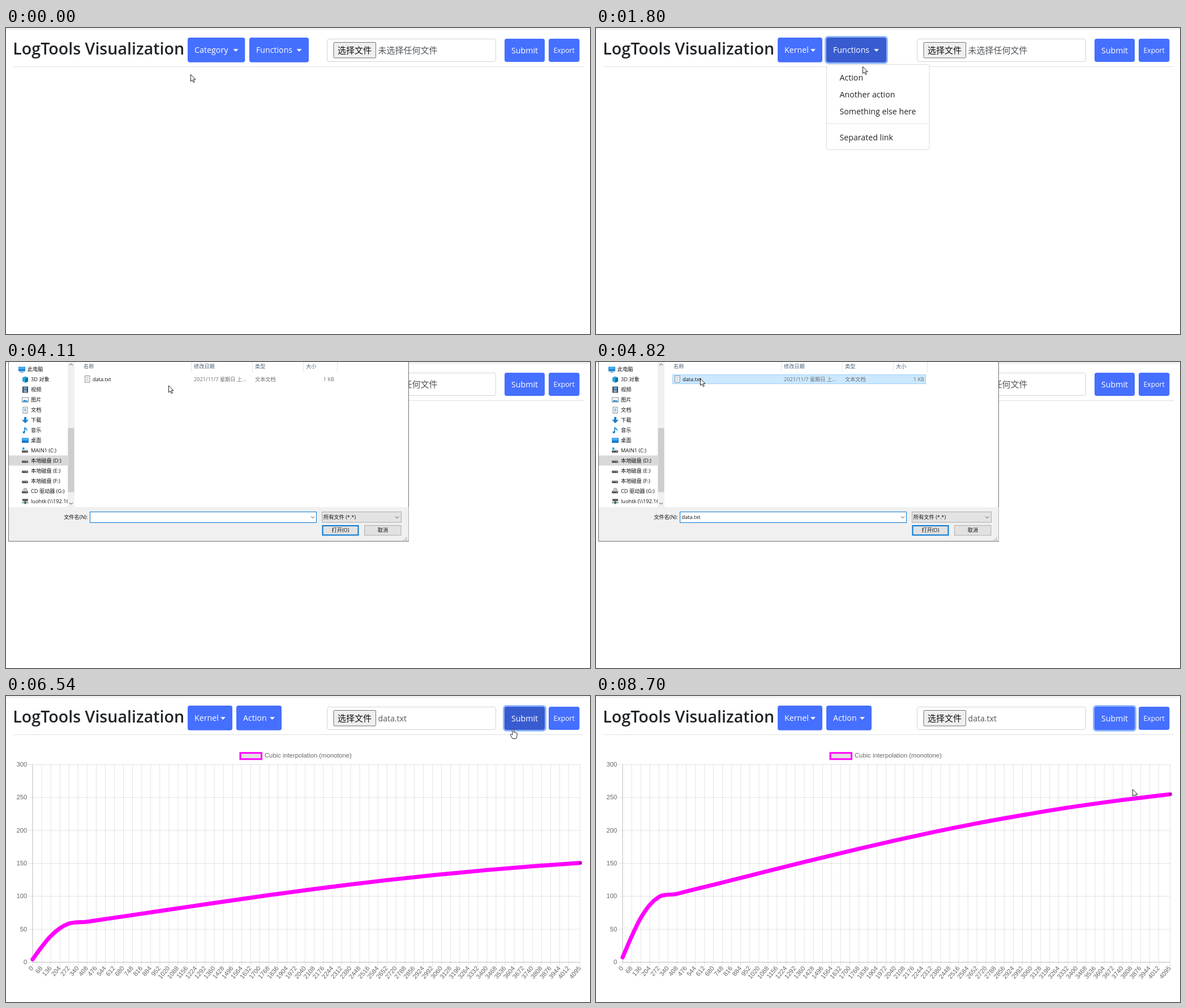
Animation, 1032 px wide and 542 px high, one loop 8.78 s. Source, as an HTML page:

```html
<!DOCTYPE html>
<html lang="zh-CN">
<head>
<meta charset="utf-8">
<title>LogTools Visualization</title>
<style>
html, body { margin: 0; width: 100%; height: 100%; overflow: hidden; background: #fff; }
svg { display: block; width: 100%; height: 100%; font-family: "Open Sans", "Noto Sans CJK SC", "Noto Sans CJK", sans-serif; }
#chart text { font-family: "Liberation Sans", Arial, sans-serif; font-size: 11.25px; fill: #666; }
#dialog text { font-size: 9.2px; }
</style>
</head>
<body>
<svg id="stage" viewBox="0 0 1032 542" xmlns="http://www.w3.org/2000/svg"></svg>
<script>
const LOOP = 8780;
const BLUE = '#456fff', DARK = '#385bcf', RING = '#8ab4fb', INK = '#212529', PINK = '#ff00ff';

// markup helpers
const rect = (x, y, w, h, fill, more = '') => `<rect x="${x}" y="${y}" width="${w}" height="${h}" fill="${fill}" ${more}/>`;
const text = (x, y, str, size, fill = INK, more = '') => `<text x="${x}" y="${y}" font-size="${size}" fill="${fill}" ${more}>${str}</text>`;
const path = (d, stroke, width = 1, fill = 'none', more = '') => `<path d="${d}" stroke="${stroke}" stroke-width="${width}" fill="${fill}" ${more}/>`;
const group = (id, body, more = '') => `<g id="${id}" ${more}>${body}</g>`;

function button(id, x, y, w, h, label, size, caret) {
  return group(id,
    rect(x - 2.8, y - 2.8, w + 5.6, h + 5.6, RING, 'rx="6" class="ring"') +
    rect(x, y, w, h, BLUE, 'rx="3.7" class="face"') +
    text(x + (size > 13 ? 12 : 8.5), y + h / 2 + (size > 13 ? 5.5 : 4.6), label, size, '#fff') +
    (caret ? path(`M${caret} 37.3h9l-4.5 4.6z`, 'none', 0, '#fff') : ''));
}

function menu(id, x, w, h, items) {
  const rows = items.map(([y, label]) => text(x + 23.5, y + 5.2, label, 14.2)).join('');
  return group(id,
    rect(x + .5, 64.5, w, h, '#fff', 'rx="3.5" stroke="#d9d9d9"') +
    rect(x + 1, 73, w - 1, 30, '#e9ecef', 'class="hover"') + rows +
    (h > 100 ? path(`M${x + 1} 169.5h${w - 1}`, '#e3e5e7') : ''));
}

function header() {
  return path('M0 1.8H1032', '#dfe1e4', 1.3) + path('M13 68.5H1021', '#dedfe0') +
    text(12.3, 47, 'LogTools Visualization', 28.6, INK, 'font-weight="600"') +
    button('category', 321, 17, 101.3, 43.8, 'Category', 14.3, 401.5) +
    button('kernel', 321, 17, 79, 43.8, 'Kernel', 14.2, 379) +
    button('functions', 430, 17, 105, 43.8, 'Functions', 14.2, 513.5) +
    button('functions2', 407, 17, 106, 43.8, 'Functions', 14.2, 491) +
    button('action', 407, 17, 80, 43.8, 'Action', 14.2, 466) +
    rect(567.5, 19.5, 298, 40, '#fff', 'rx="3.5" stroke="#ced4da"') +
    rect(579, 25.5, 74.5, 27.5, '#efefef', 'id="pick" rx="1.5" stroke="#707070"') +
    text(586, 45.3, '选择文件', 15, '#111') +
    text(657.5, 45.3, '未选择任何文件', 15, '#50555a', 'id="nofile"') +
    text(657.5, 45, 'data.txt', 14.1, '#50555a', 'id="file"') +
    button('submit', 881, 19, 71, 41, 'Submit', 14.2) +
    button('export', 959, 19, 54.4, 41, 'Export', 12.2);
}

// chart geometry
const X0 = 47, X1 = 1014.5, Y0 = 471.5, UNIT = 350 / 300;
const shape = [[47, 8.5], [62, 43.5], [78, 76.5], [95, 101.5], [111, 115.5], [122, 119], [140, 120.5], [160, 125.5],
  [207, 137], [300, 160.5], [368, 177.5], [465, 201], [530, 216], [600, 231.2], [672, 245.8], [770, 263.3], [850, 276.2], [930, 287.3], [1014.5, 297.5]];

function curve(p) {
  const slope = i => {
    const a = p[Math.max(i - 1, 0)], b = p[Math.min(i + 1, p.length - 1)];
    return (b[1] - a[1]) / (b[0] - a[0]);
  };
  let d = `M${p[0]}`;
  for (let i = 1; i < p.length; i++) {
    const [ax, ay] = p[i - 1], [bx, by] = p[i], s = (bx - ax) / 3;
    d += `C${ax + s} ${ay + s * slope(i - 1)} ${bx - s} ${by - s * slope(i)} ${bx} ${by}`;
  }
  return d;
}

function chart() {
  let grid = '', labels = '';
  for (let i = 0; i <= 60; i++) {
    const last = i === 60, x = last ? X1 : X0 + i * 4 * (X1 - X0) / 241;
    grid += `M${x.toFixed(2)} 121.5V479`;
    labels += `<text transform="translate(${(x - 1).toFixed(2)} 480) rotate(-50)" y="4" text-anchor="end">${last ? 4095 : i * 68}</text>`;
  }
  for (let v = 0; v <= 300; v += 50) {
    const y = Y0 - v * UNIT;
    grid += `M39 ${y.toFixed(2)}H${X1}`;
    labels += `<text x="37.3" y="${y + 3.5}" text-anchor="end">${v}</text>`;
  }
  return path(grid, '#000', 1, 'none', 'stroke-opacity=".11"') +
    path(`M${X0} 121.5V${Y0}H${X1}`, '#000', 1, 'none', 'stroke-opacity=".17"') + labels +
    rect(414, 100.8, 37.5, 11, '#e2e2e2', `stroke="${PINK}" stroke-width="3"`) +
    '<text x="457" y="109.4">Cubic interpolation (monotone)</text>' +
    path(curve(shape), PINK, 7.2, 'none', 'id="line" vector-effect="non-scaling-stroke" stroke-linecap="round" stroke-linejoin="round"') +
    '<circle id="end" cx="1014.5" r="2" fill="#7a1a7a"/>';
}

// file dialog
const drive = rect(0, 5, 11, 4, '#4a4a4a', 'rx="1"') + rect(1, 4, 9, 2, '#b5b5b5') + rect(8, 6.5, 1.5, 1, '#7fe08a');
const screen = rect(0, 1, 12, 8, '#1c86d6') + rect(1, 2, 10, 3, '#46b4f2');
const icons = {
  pc: screen + rect(3, 10, 6, 1.2, '#69808f'),
  cube: path('M6 0 11 2V9L6 11 1 9V2z', 'none', 0, '#2aa5dc') + path('M6 4 11 2V9L6 11z', 'none', 0, '#0c6fa8'),
  film: rect(1, 0, 10, 11, '#3d4650') + rect(3, 1, 6, 4, '#5f9fd8') + rect(3, 6, 6, 4, '#86a9c6'),
  photo: rect(.5, 1.5, 11, 8, '#fff', 'stroke="#7d8b96"') + path('M1 9 4 5 7 7 9 6 11 9z', 'none', 0, '#2e8ac9'),
  doc: rect(2, .5, 8, 10.5, '#fff', 'stroke="#7d8b96"') + path('M4 3.5h4M4 5.5h4M4 7.5h4', '#4b93c9'),
  down: path('M4 0H8V5H12L6 11 0 5H4z', 'none', 0, '#1e7fd0'),
  note: path('M5 9V1Q9 3 9 6', '#1580d2', 1.6) + '<circle cx="3.6" cy="9" r="2" fill="#1580d2"/>',
  desk: screen + rect(0, 8, 12, 1.5, '#0d5ea6'),
  system: drive + rect(1, 0, 3.5, 3.5, '#1aa0e8'),
  drive,
  disc: drive + '<circle cx="6" cy="3" r="3" fill="#c9ccd0" stroke="#777" stroke-width=".7"/>',
  net: rect(1, 1, 10, 4, '#555') + rect(0, 7, 12, 1.5, '#4c9b6a') + rect(4.5, 5, 3, 5, '#555')
};
const places = [['pc', '此电脑'], ['cube', '3D 对象'], ['film', '视频'], ['photo', '图片'], ['doc', '文档'], ['down', '下载'],
  ['note', '音乐'], ['desk', '桌面'], ['system', 'MAIN1 (C:)'], ['drive', '本地磁盘 (D:)'], ['drive', '本地磁盘 (E:)'],
  ['drive', '本地磁盘 (F:)'], ['disc', 'CD 驱动器 (G:)'], ['net', 'luohtk (\\\\192.16']];

function dialog() {
  const side = places.map(([icon, label], i) => {
    const x = i ? 28 : 22, y = 12.5 + 18 * i;
    return `<g transform="translate(${x} ${y - 5})">${icons[icon]}</g>` + text(x + 16, y + 3.4, label, 9.2, '#111');
  }).join('');
  const chevron = (x, y, s) => path(`M${x - 3} ${y - 1.5 * s}l3 ${3 * s} 3 ${-3 * s}`, '#444');
  const heads = [[137, '名称'], [332, '修改日期'], [440, '类型'], [530, '大小']];
  return rect(4.5, -2, 707, 319.5, '#fff', 'stroke="#707070"') +
    rect(5, 165.5, 104, 18, '#d9d9d9') + side +
    rect(109, 0, 12, 257, '#f0f0f0') + rect(109.5, 117, 11, 113.5, '#cdcdcd') +
    chevron(115, 4.5, -1) + chevron(115, 250.5, 1) +
    heads.map(([x, s]) => text(x, 11, s, 9.2, '#4c607a')).join('') +
    path('M327.5 0V18M435.5 0V18M525.5 0V18M585.5 0V18', '#e3e3e3') +
    rect(135.5, 22.5, 447, 16, '#cce8ff', 'id="row" stroke="#99d1ff"') +
    rect(139.5, 24.5, 8.5, 11.5, '#fff', 'stroke="#8c8c8c"') + path('M141.5 27.5h4.5M141.5 30h4.5M141.5 32.5h4.5', '#999', .8) +
    text(153, 33.8, 'data.txt', 9.2, '#111') + text(332, 33.8, '2021/11/7 星期日 上...', 9.2, '#6d6d6d') +
    text(440, 33.8, '文本文档', 9.2, '#6d6d6d') + text(580, 33.8, '1 KB', 9.2, '#6d6d6d', 'text-anchor="end"') +
    rect(5, 257, 706.5, 60, '#f0f0f0') +
    text(144.5, 278, '文件名(N):', 9.2, '#111', 'text-anchor="end"') +
    rect(148.5, 265.5, 400, 19, '#fff', 'stroke="#0a78d2"') + chevron(542, 275, 1) +
    text(151.5, 278.3, 'data.txt', 9.2, '#111', 'id="name"') +
    rect(558.5, 265.5, 140, 18.5, '#e3e3e3', 'stroke="#adadad"') + text(561, 278, '所有文件 (*.*)', 9.2, '#111') + chevron(691, 275, 1) +
    rect(559.5, 290, 63, 16.5, '#e1e1e1', 'stroke="#0078d7" stroke-width="2"') +
    text(591, 301.2, '打开(O)', 9.2, '#111', 'text-anchor="middle"') +
    rect(633.5, 289.5, 64.5, 17.5, '#e1e1e1', 'stroke="#adadad"') +
    text(666, 301.2, '取消', 9.2, '#111', 'text-anchor="middle"') +
    path('M708 310v6M705.5 312.5v3.5M703 314.7v1.3', '#aaa', 1.5, 'none', 'stroke-dasharray="1.5 1"');
}

const arrow = path('M.4.4V12.6L3.2 10 5.3 14.5 7.3 13.6 5.2 9.2H9z', '#222', 1, '#fff', 'stroke-linejoin="round"');
const hand = path('M-1.2 11V1.4Q0-.6 1.2 1.4V6.2L3 6 3.6 6.9 5.2 6.6 5.8 7.5 7 7.6V12.5L5.8 17.5H-1L-4.6 11.3Q-4.6 9.2-2.6 10z', '#223', 1, '#fff', 'stroke-linejoin="round"');

document.getElementById('stage').innerHTML = header() +
  menu('menuA', 321, 149.5, 77, [[88, 'Kernel'], [118, 'System']]) +
  menu('menuB', 407, 181.5, 151, [[88, 'Action'], [118, 'Another action'], [148, 'Something else here'], [194, 'Separated link']]) +
  group('chart', chart()) + group('dialog', dialog()) +
  group('cursor', group('arrow', arrow) + group('hand', hand));

const $ = id => document.getElementById(id);
const show = (node, on) => node.setAttribute('visibility', on ? 'inherit' : 'hidden');
const within = (t, a, b) => t >= a && t < b;
const clamp = v => Math.min(1, Math.max(0, v));

// pointer route: time, x, y
const route = [[0, 326, 82], [70, 326, 82], [350, 352, 46], [600, 352, 46], [880, 346, 84], [1100, 346, 84], [1430, 462, 44],
  [1640, 466, 46], [1800, 471, 68], [1870, 470, 90], [1940, 471, 98], [2290, 471, 98], [2780, 612, 44], [3050, 612, 44],
  [3330, 560, 72], [3650, 560, 72], [4350, 186, 30], [4820, 184, 29], [5000, 184, 29], [5650, 896, 52], [5800, 896, 58],
  [6880, 896, 58], [6960, 895, 61], [8420, 895, 61], [8550, 897, 66], [8699, 897, 66], [8700, 948, 165], [LOOP, 948, 165]];
const handTimes = [[230, 680], [800, 1140], [1390, 1730], [1830, 2330], [5610, 6910]];

function pointer(t) {
  const i = Math.max(1, route.findIndex(k => k[0] > t));
  const [ta, ax, ay] = route[i - 1], [tb, bx, by] = route[i];
  const p = clamp((t - ta) / (tb - ta)), e = p * p * (3 - 2 * p);
  return [ax + (bx - ax) * e, ay + (by - ay) * e];
}

function setButton(id, on, dark, ring) {
  const b = $(id);
  show(b, on);
  show(b.querySelector('.ring'), on && ring);
  b.querySelector('.face').setAttribute('fill', dark ? DARK : BLUE);
}

function draw(t) {
  const picked = t >= 1080, acted = t >= 2250, loaded = t >= 5000;
  const openA = within(t, 430, 1080), openB = within(t, 1600, 2250);
  setButton('category', !picked, t > 250, t > 400);
  setButton('kernel', picked, false, false);
  setButton('functions', !picked, false, false);
  setButton('functions2', picked && !acted, t > 1400, t > 1560);
  setButton('action', acted, false, false);
  setButton('submit', true, within(t, 5630, 6920), t >= 5950);
  setButton('export', true, false, false);
  show($('menuA'), openA);
  show($('menuA').querySelector('.hover'), openA && t > 800);
  show($('menuB'), openB);
  show($('menuB').querySelector('.hover'), openB && t > 1830);

  $('pick').setAttribute('fill', within(t, 2740, 5000) ? '#e5e5e5' : '#efefef');
  show($('nofile'), !loaded);
  show($('file'), loaded);

  const asking = within(t, 3520, 5000), chosen = asking && t >= 4430;
  show($('dialog'), asking);
  show($('row'), asking && t >= 4230);
  $('row').setAttribute('fill', chosen ? '#cce8ff' : '#e5f3ff');
  $('row').setAttribute('stroke', chosen ? '#99d1ff' : '#e5f3ff');
  show($('name'), chosen);

  // quartic ease-out growth from the baseline
  const grow = 1 - (1 - clamp((t - 6077) / 2316)) ** 4;
  show($('chart'), t >= 6130);
  $('line').setAttribute('transform', `translate(0 ${Y0}) scale(1 ${-Math.max(grow, .001)})`);
  $('end').setAttribute('cy', Y0 - 297.5 * grow);

  const [x, y] = pointer(t), pointing = handTimes.some(([a, b]) => within(t, a, b));
  $('cursor').setAttribute('transform', `translate(${x.toFixed(2)} ${y.toFixed(2)})`);
  show($('arrow'), !pointing);
  show($('hand'), pointing);
}

const start = performance.now();
function tick() {
  draw((performance.now() - start) % LOOP);
  requestAnimationFrame(tick);
}
tick();
</script>
</body>
</html>
```
